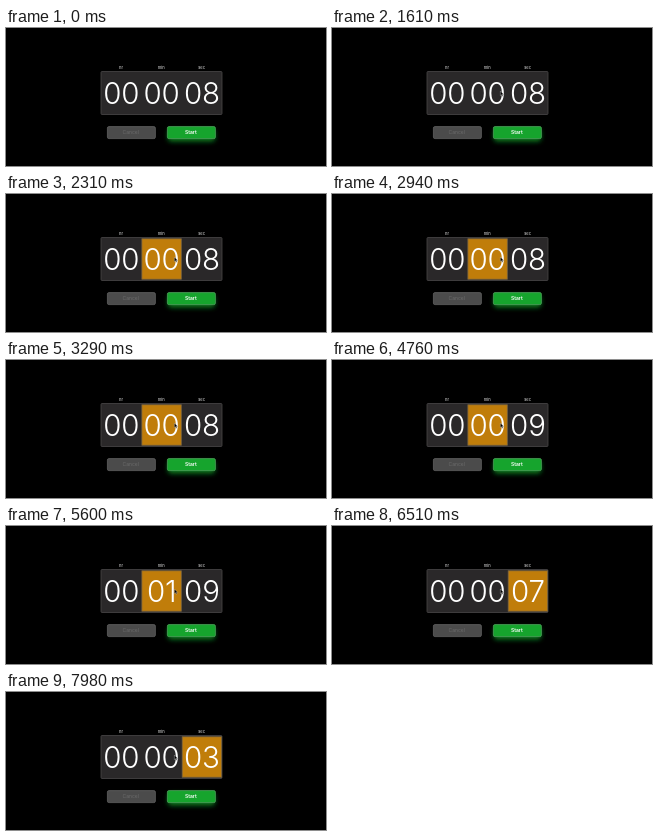
An HTML page for the animation above (8 s loop, 320 px wide and 138 px high).

```html
<!DOCTYPE html>
<html lang="en">
<head>
<meta charset="utf-8">
<title>Timer</title>
<style>
  html, body { margin: 0; width: 100%; height: 100%; overflow: hidden; background: #000; }
  svg { display: block; width: 100vw; height: 100vh; }
  text { font-family: Inter, Roboto, sans-serif; text-anchor: middle; }
  .digits { font-size: 29.5px; font-weight: 300; letter-spacing: -.2px; fill: #fff; }
  .label { font-size: 4px; font-weight: 500; fill: #c8c8c8; }
  .button { font-size: 5px; }
</style>
</head>
<body>
<svg viewBox="0 0 320 138">
  <defs>
    <filter id="blur" x="-30%" y="-100%" width="160%" height="300%">
      <feGaussianBlur stdDeviation="2.6"/>
    </filter>
  </defs>

  <rect x="95" y="43.5" width="121" height="43" rx="1" fill="#2a2829" stroke="#494748" stroke-width=".8"/>
  <rect id="focus" y="44.8" width="39.4" height="40.4" fill="#c07d0a" stroke="#7a6540" stroke-width=".8"/>
  <g id="fields"></g>

  <rect x="101.4" y="98.6" width="48" height="12" rx="1.5" fill="#4b4b4b" stroke="#686868" stroke-width=".7"/>
  <text class="button" x="124.7" y="106.3" fill="#6b6b6b">Cancel</text>

  <rect x="162" y="101.5" width="47" height="12" rx="3" fill="#0f9a25" opacity=".8" filter="url(#blur)"/>
  <rect x="161.4" y="98.6" width="48" height="12" rx="1.5" fill="#16a42d" stroke="#4f9f5b" stroke-width=".8"/>
  <text class="button" x="184.8" y="106.3" font-weight="600" fill="#fff">Start</text>

  <path id="cursor" d="M0 0V6.2L1.5 4.9L2.5 7.1L3.5 6.6L2.5 4.5H4.4Z" fill="#000" stroke="#ddd" stroke-width=".45"/>
</svg>
<script>
  const LOOP = 8000;
  const HR = 0, MIN = 1, SEC = 2;
  const labels = ['hr', 'min', 'sec'];

  // Each table holds [start time, value] steps.
  const focusSteps = [
    [0, -1], [2310, MIN], [2450, SEC], [2800, MIN], [3010, HR], [3290, MIN], [3570, SEC],
    [4200, MIN], [4480, HR], [4760, MIN], [5880, SEC]
  ];
  const valueSteps = [
    [[0, 0]],
    [[0, 0], [5040, 1], [5670, 0]],
    [[0, 8], [3850, 9], [6300, 8], [6510, 7], [6720, 6], [7070, 5], [7350, 4], [7700, 3]]
  ];

  const byId = id => document.getElementById(id);
  const focus = byId('focus'), cursor = byId('cursor');

  function addText(cls, x, y, content) {
    const el = document.createElementNS('http://www.w3.org/2000/svg', 'text');
    el.setAttribute('class', cls);
    el.setAttribute('x', x);
    el.setAttribute('y', y);
    el.textContent = content;
    byId('fields').append(el);
    return el;
  }

  const digits = labels.map((name, i) => {
    const x = 115.3 + i * 40.3;
    addText('label', x - .3, 40.6, name);
    return addText('digits', x, 75.6, '00');
  });

  const valueAt = (steps, t) => steps.reduce((v, [start, next]) => t >= start ? next : v, 0);

  function draw(t) {
    const cell = valueAt(focusSteps, t);
    focus.setAttribute('visibility', cell < 0 ? 'hidden' : 'visible');
    focus.setAttribute('x', 95.6 + cell * 40.3);
    digits.forEach((el, i) => {
      const text = String(valueAt(valueSteps[i], t)).padStart(2, '0');
      if (el.textContent !== text) el.textContent = text;
    });

    const p = Math.min(1, Math.max(0, (t - 300) / 750));
    const ease = 1 - (1 - p) ** 2;
    const x = 182 - 13.6 * ease, y = 139 - 76 * ease;
    cursor.setAttribute('transform', `translate(${x} ${y}) scale(.75)`);
  }

  const begin = performance.now();
  function tick() {
    draw((performance.now() - begin) % LOOP);
    requestAnimationFrame(tick);
  }
  tick();
</script>
</body>
</html>
```
